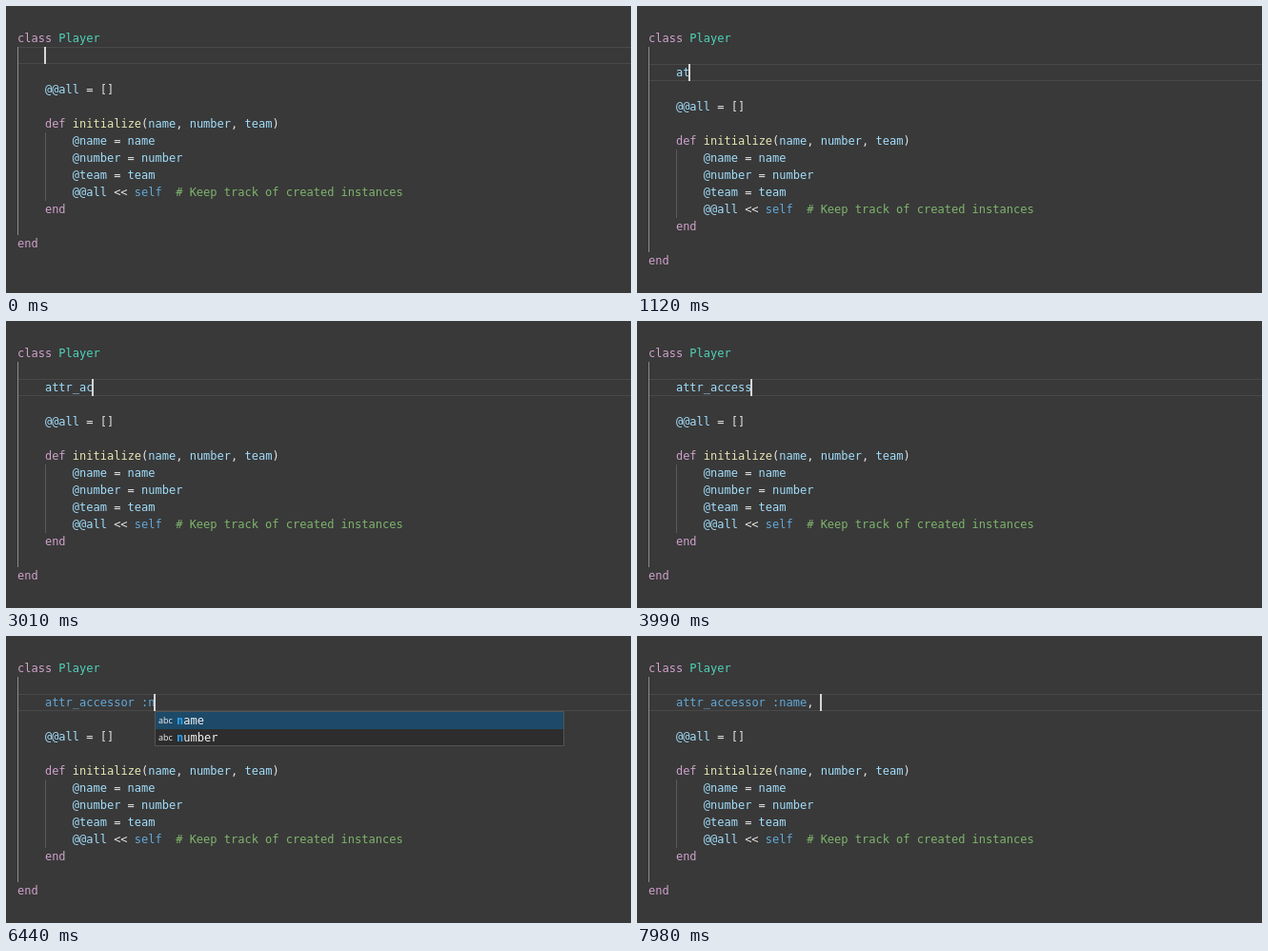
An HTML page for the animation above (8 s loop, 656 px wide and 302 px high).

```html
<!DOCTYPE html>
<html lang="en">
<head>
<meta charset="utf-8">
<style>
  html, body { margin: 0; width: 100%; height: 100%; overflow: hidden; background: #393939; }
  body { position: relative; font: 12px/18px "DejaVu Sans Mono", monospace; color: #e4e4e4; }
  div, pre { position: absolute; margin: 0; font: inherit; box-sizing: border-box; white-space: pre; }
  #head, #tail, #typed { left: 12px; }
  #head { top: 25px; }
  #row { left: 12px; right: 0; height: 18px; border: solid #494949; border-width: 1px 0; }
  #caret { width: 2px; height: 18px; background: #d6d6d6; }
  .guide { width: 1px; background: #5a5a5a; }
  #outer { left: 12px; top: 43px; background: #8c8c8c; }
  #inner { left: 41px; height: 72px; }
  #popup { top: 79px; width: 430px; border: 1px solid #545454; background: #2d2d2d; overflow: hidden; }
  #popup p { margin: 0; height: 18px; padding-left: 22px; position: relative; color: #f0f0f0; }
  #popup p:first-child { background: #1d4a68; }
  #popup i { position: absolute; left: 3px; font: 9px/17px "Open Sans", sans-serif; }
  #popup b { color: #2aa4f4; }
  .k { color: #d0a2cc; }
  .c { color: #4fd2b9; }
  .f { color: #e6e6b4; }
  .v { color: #a2defc; }
  .b { color: #62a9da; }
  .g { color: #7fb56d; }
</style>
</head>
<body>
<div id="row"></div>
<div id="outer" class="guide"></div>
<div id="inner" class="guide"></div>
<pre id="head"><span class="k">class</span> <span class="c">Player</span></pre>
<pre id="typed"></pre>
<pre id="tail">    <span class="v">@@all</span> = []

    <span class="k">def</span> <span class="f">initialize</span>(<span class="v">name</span>, <span class="v">number</span>, <span class="v">team</span>)
        <span class="v">@name</span> = <span class="v">name</span>
        <span class="v">@number</span> = <span class="v">number</span>
        <span class="v">@team</span> = <span class="v">team</span>
        <span class="v">@@all</span> &lt;&lt; <span class="b">self</span>  <span class="g"># Keep track of created instances</span>
    <span class="k">end</span>

<span class="k">end</span></pre>
<div id="popup"></div>
<div id="caret"></div>
<script>
const LOOP = 8000, ENTER = 400, CHAR = 7.224, POPUP_DELAY = 90, BLINK = 500;
const LINE = "attr_accessor :name, ";
const KEYS = [740, 1120, 1400, 1650, 2200, 2600, 2850, 3150, 3450, 3700, 3950,
  4150, 4450, 5600, 5850, 6150, 6550, 6800, 7050, 7500, 7800];
const WORDS = ["all", "name", "number"];
const el = id => document.getElementById(id);
const [row, outer, inner, typed, tail, popup, caret] =
  ["row", "outer", "inner", "typed", "tail", "popup", "caret"].map(el);
const span = (cls, text) => `<span class="${cls}">${text}</span>`;

function colour(text, age) {
  if (text === "a" && age < POPUP_DELAY) return text;
  const [, word, rest, comma] = text.match(/^(\w*)([^,]*)(.*)$/);
  const isKeyword = word === "attr" || word === "attr_accessor";
  return span(isKeyword ? "b" : "v", word) + span("b", rest) + comma;
}

function suggestions(text) {
  const prefix = text === "a" ? text : (text.match(/:(\w+)$/) || [])[1];
  if (!prefix) return [];
  return WORDS.filter(w => w.startsWith(prefix))
    .map(w => `<p><i>abc</i><b>${prefix}</b>${w.slice(prefix.length)}</p>`);
}

function render(t) {
  const count = KEYS.filter(k => k <= t).length;
  const text = LINE.slice(0, count);
  const lastKey = count ? KEYS[count - 1] : t < ENTER ? 0 : ENTER;
  const age = t - lastKey;
  const shift = t < ENTER ? 0 : 18;
  const caretX = 12 + (4 + count) * CHAR;

  row.style.top = typed.style.top = caret.style.top = 43 + shift + "px";
  tail.style.top = 79 + shift + "px";
  outer.style.height = 198 + shift + "px";
  inner.style.top = 133 + shift + "px";
  typed.innerHTML = "    " + colour(text, age);
  caret.style.left = Math.floor(caretX - 0.5) + "px";
  caret.style.opacity = Math.floor(age / BLINK) % 2 ? 0 : 1;

  // An open list follows the caret; a new one appears after a short delay.
  const isFirst = text === "a" || text.endsWith(":n");
  const items = isFirst && age < POPUP_DELAY ? [] : suggestions(text);
  popup.hidden = !items.length;
  popup.style.left = Math.round(caretX) + "px";
  popup.style.height = 18 * items.length + 1 + "px";
  popup.innerHTML = items.join("");
}

function tick() {
  render(performance.now() % LOOP);
  requestAnimationFrame(tick);
}
tick();
</script>
</body>
</html>
```
